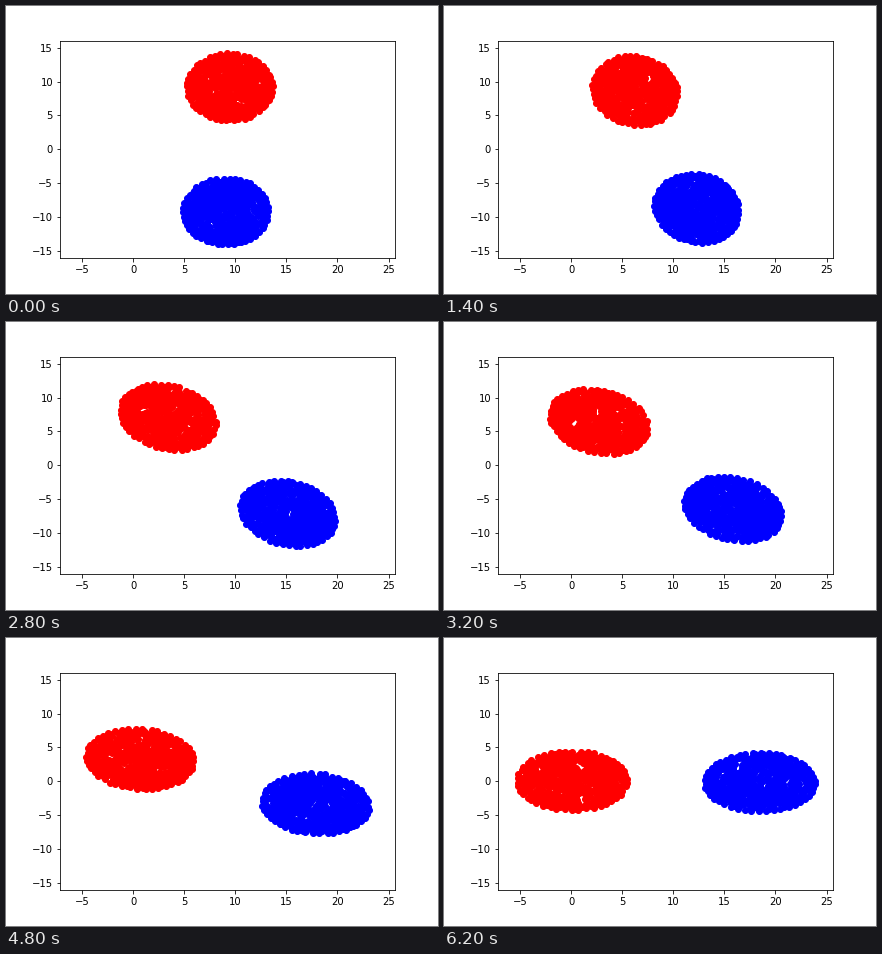
Animation of 432x288 px, one loop 6400 ms. Source, as a matplotlib script:

```python
import numpy as np
import matplotlib.pyplot as plt
from matplotlib.animation import FuncAnimation

FRAMES, INTERVAL = 32, 200
CENTRE_X, ORBIT = 9.26, 9.2
RIM, INNER = 46, 600
SPIN = np.radians(16)

plt.rcParams.update({"font.family": "DejaVu Sans", "font.size": 10})

fig = plt.figure(figsize=(6, 4), dpi=72, facecolor="white")
ax = fig.add_axes([0.125, 0.125, 0.775, 0.755])
ax.set_xlim(-7.174, 25.614)
ax.set_ylim(-16.06, 16.06)
ax.set_xticks(range(-5, 26, 5))
ax.set_yticks(range(-15, 16, 5))


def make_body(seed):
    """Unit disc of particles with a slightly uneven rim."""
    rng = np.random.default_rng(seed)
    rim_angle = 2 * np.pi * (np.arange(RIM) + rng.uniform(-0.2, 0.2, RIM)) / RIM
    angle = np.concatenate([rng.uniform(0, 2 * np.pi, INNER), rim_angle])
    radius = np.concatenate([0.96 * np.sqrt(rng.random(INNER)),
                             rng.uniform(0.975, 1.01, RIM)])
    return radius, angle


def place(body, frame, side):
    """Stretch and skew a body by the tide, then put it on its orbit."""
    radius, angle = body
    theta = np.radians(88.8 + 2.92 * frame)
    knots = [0, 7, 14, 24, 31]
    width = np.interp(frame, knots, [4.2, 4.15, 4.68, 5.26, 5.4])
    height = np.interp(frame, knots, [4.95, 5.1, 4.85, 4.45, 4.37])
    skew = -0.2 * np.sin(np.pi * frame / (FRAMES - 1)) ** 2
    phase = angle + SPIN * frame
    u, v = radius * np.cos(phase), radius * np.sin(phase)
    x = CENTRE_X + side * ORBIT * np.cos(theta) + width * u
    y = side * ORBIT * np.sin(theta) + height * (skew * u + np.sqrt(1 - skew**2) * v)
    return x, y


pair = [(make_body(seed), side, ax.plot([], [], "o", color=color, ms=6)[0])
        for seed, side, color in [(4, 1, "red"), (9, -1, "blue")]]


def update(frame):
    for body, side, dots in pair:
        dots.set_data(*place(body, frame, side))
    return [dots for _, _, dots in pair]


anim = FuncAnimation(fig, update, frames=FRAMES, interval=INTERVAL,
                     repeat=True, repeat_delay=0)
plt.show()
```
